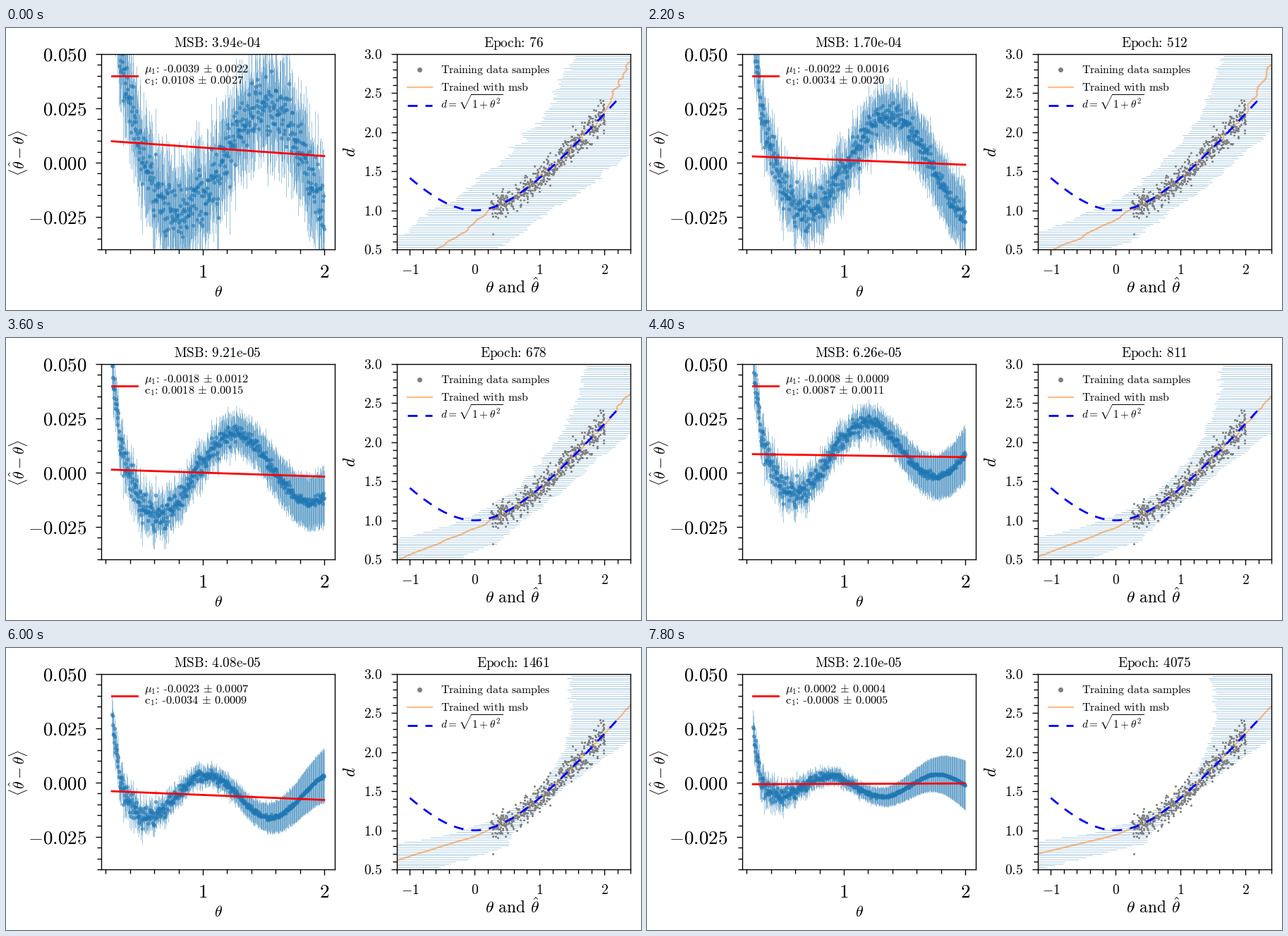
Recreate the animation shown at these times as a matplotlib script. Size 900x400 px, loop 8 s.

```python
import numpy as np
import matplotlib.pyplot as plt
from matplotlib.animation import FuncAnimation
from matplotlib.lines import Line2D
from matplotlib.ticker import AutoMinorLocator

W, H = 900, 400
FRAMES, STEP = 40, 200

plt.rcParams.update({
    "font.family": "Liberation Serif",
    "mathtext.fontset": "cm",
    "axes.linewidth": 1.0,
})

# Readouts at a few moments; everything between is interpolated.
KEYS = [0, 5, 11, 15, 22, 30, 39]
LOG_EPOCH = np.log([76, 285, 512, 593, 811, 1461, 4075])
LOG_MSB = np.log([3.94e-4, 2.52e-4, 1.70e-4, 1.23e-4, 6.26e-5, 4.08e-5, 2.10e-5])
SLOPE = 1e-4 * np.array([-39, -52, -22, -26, -8, -23, 2])
OFFSET = 1e-4 * np.array([108, -5, 34, -34, 87, -34, -8])
SLOPE_ERR = 1e-4 * np.array([21.9, 19, 16, 14.1, 9, 7, 4])
OFFSET_ERR = 1.25 * SLOPE_ERR
TO_THETA = 45  # bar length in the right panel per unit of bias spread


def bias_shape(x, p):
    """Damped wave with a spike at low theta and a sagging tail."""
    wave = -np.cos(np.pi * (x - .78 + .36 * p) / (.78 - .33 * p))
    spike = np.exp(-(x - .25) / (.13 - .07 * p))
    tail = np.clip((x - 1.5) / .5, 0, None) ** 2
    return ((.027 - .022 * p) * wave + (.07 - .04 * p) * spike
            - .015 * max(0, 1 - 1.6 * p) * tail)


def spread(x, p):
    """Half length of the error bars: shrinks fastest around theta = 1."""
    bowl = (np.maximum(x, -.5) - 1) ** 2
    return .0035 + .0165 * (1 - p) ** 2 + .008 * min(1, 1.3 * p) * bowl


def trained_theta(d, p):
    """Trained curve: the true relation inside, straight lines outside."""
    low, mid = .13 + .57 * p ** .6, .85 + .09 * p
    high = 2.75 - .16 * np.tanh((p - .39) / .08)
    x = np.concatenate([[-3, 0], np.linspace(.5, 2, 7), [4]])
    y = np.sqrt(1 + x ** 2)
    y[:2] = mid - 2.5 * (mid - low), mid
    y[-1] = y[-2] + 5 * (high - y[-2])
    return np.interp(d, y, x)


def roman(text):
    """Upright maths text that keeps short hyphens."""
    return "-".join(rf"$\text{{{p}}}$" if p else "" for p in text.split("-"))


def fit_label(symbol, value, error):
    sign = "-" if value < 0 else ""
    return (rf"${symbol}_\mathrm{{1}}\text{{: }}$" + sign
            + rf"$\text{{{abs(value):.4f} }}{{\pm}}\text{{ {error:.4f}}}$")


def tick_label(value, digits):
    sign = "-" if value < 0 else ""
    return rf"${sign}\mathrm{{{abs(value):.{digits}f}}}$"


fig = plt.figure(figsize=(W / 100, H / 100), dpi=100, facecolor="white")


def put(x, y, text, size, **kw):
    return fig.text(x / W, 1 - y / H, text, fontsize=size, **kw)


def handle(x0, x1, y, **kw):
    fig.add_artist(Line2D([x0 / W, x1 / W], [1 - y / H] * 2, **kw))


def panel(x0, xlim, ylim, xticks, yticks, digits, size):
    ax = fig.add_axes([x0 / W, (H - 314) / H, 331 / W, 277 / H])
    ax.set(xlim=xlim, ylim=ylim)
    ax.set_xticks(xticks, [tick_label(v, 0) for v in xticks])
    ax.set_yticks(yticks, [tick_label(v, digits) for v in yticks])
    ax.xaxis.set_minor_locator(AutoMinorLocator(5))
    ax.yaxis.set_minor_locator(AutoMinorLocator(5))
    ax.tick_params(which="major", length=6, width=1, pad=9, labelsize=size)
    ax.tick_params(which="minor", length=4, width=1)
    return ax


left = panel(135, (.1625, 2.0875), (-.04, .05), [1, 2],
             np.arange(-1, 3) * .025, 3, 19.5)
right = panel(554, (-1.2, 2.4), (.5, 3), range(-1, 3),
              np.arange(1, 7) * .5, 1, 14.2)

rng = np.random.default_rng(7)
theta = np.linspace(.25, 2, 500)
point_noise, bar_noise = rng.normal(size=(2, theta.size))
ends = np.array([.25, 2])
grid = np.linspace(.5, 3, 100)

# left panel
v_bars = left.vlines(theta, 0, 0, color="C0", lw=.6, alpha=.5)
dots, = left.plot([], [], "o", color="C0", ms=3, alpha=.5)
fit_line, = left.plot([], [], color="red", lw=2, zorder=4)

# right panel
h_bars = right.hlines(grid, 0, 0, color="C0", lw=.5, alpha=.5)
trained, = right.plot([], [], color="C1", lw=1.6, alpha=.5)
sample_x = np.append(rng.uniform(.25, 2, 500), .28)
sample_d = np.sqrt(1 + sample_x ** 2) + np.append(rng.normal(0, .09, 500), -.338)
right.plot(sample_x, sample_d, "o", color="gray", ms=2.2, mew=0)
truth = np.linspace(-1, 2.2, 200)
DASH = (0, (5, 4))
right.plot(truth, np.sqrt(1 + truth ** 2), color="blue", lw=2, ls=DASH)

# legends
handle(149.5, 185.5, 68, color="red", lw=2)
handle(586, 586, 59, color="gray", marker="o", ms=4.8, mew=0)
handle(568.5, 603.5, 84, color="C1", lw=1.6, alpha=.5)
handle(568.5, 603.5, 110, color="blue", lw=2, ls=DASH)
put(616, 64, roman("Training data samples"), 11.35)
put(616, 89, roman("Trained with msb"), 11.35)
put(616.5, 114.5, r"$d=\sqrt{\mathrm{1}+\theta^\mathrm{2}}$", 11)
slope_text = put(196, 63, "", 11.8)
offset_text = put(196, 79, "", 11.8)

# titles and axis labels
msb_title = put(300, 27, "", 13.9, ha="center")
epoch_title = put(719, 27, "", 13.9, ha="center")
put(300.5, 381, r"$\theta$", 15.6, ha="center")
put(18.5, 177, r"$\langle\hat{\theta}-\theta\rangle$", 15.8,
    rotation=90, ha="center", va="center")
put(718, 376, r"$\theta\text{ and }\hat{\theta}$", 16.9, ha="center")
put(490, 176, r"$d$", 17.3, rotation=90, ha="center", va="center")


def draw(frame):
    p = frame / (FRAMES - 1)
    slope, offset, slope_err, offset_err, log_msb, log_epoch = (
        np.interp(frame, KEYS, v)
        for v in (SLOPE, OFFSET, SLOPE_ERR, OFFSET_ERR, LOG_MSB, LOG_EPOCH))

    # The residual carries no line of its own, so the red fit stays true.
    shape = bias_shape(theta, p)
    trend = np.polyval(np.polyfit(theta, shape, 1), theta)
    fade = np.exp(-2 * p * (theta - .25))
    bias = (shape - trend + slope * theta + offset
            + (.007 - .0035 * p) * fade * point_noise)
    half = spread(theta, p) * (1 + .16 * fade * bar_noise)
    v_bars.set_segments([[(x, y - e), (x, y + e)]
                         for x, y, e in zip(theta, bias, half)])
    dots.set_data(theta, bias)
    fit_line.set_data(ends, slope * ends + offset)

    local = np.random.default_rng(100 + frame)
    jitter = np.convolve(local.normal(size=grid.size), [.5, .7, .5], "same")
    centre = trained_theta(grid, p) + (.004 + .028 * (1 - p)) * jitter
    reach = TO_THETA * spread(centre, p) * (1 + .03 * local.normal(size=grid.size))
    h_bars.set_segments([[(x - e, y), (x + e, y)]
                         for x, y, e in zip(centre, grid, reach)])
    trained.set_data(centre, grid)

    slope_text.set_text(fit_label(r"\mu", slope, slope_err))
    offset_text.set_text(fit_label(r"\mathrm{c}", offset, offset_err))
    msb_title.set_text(roman(f"MSB: {np.exp(log_msb):.2e}"))
    epoch_title.set_text(roman(f"Epoch: {np.exp(log_epoch):.0f}"))
    return v_bars, dots, fit_line, h_bars, trained


anim = FuncAnimation(fig, draw, frames=FRAMES, interval=STEP,
                     init_func=lambda: draw(0), repeat=True, blit=False)
plt.show()
```
